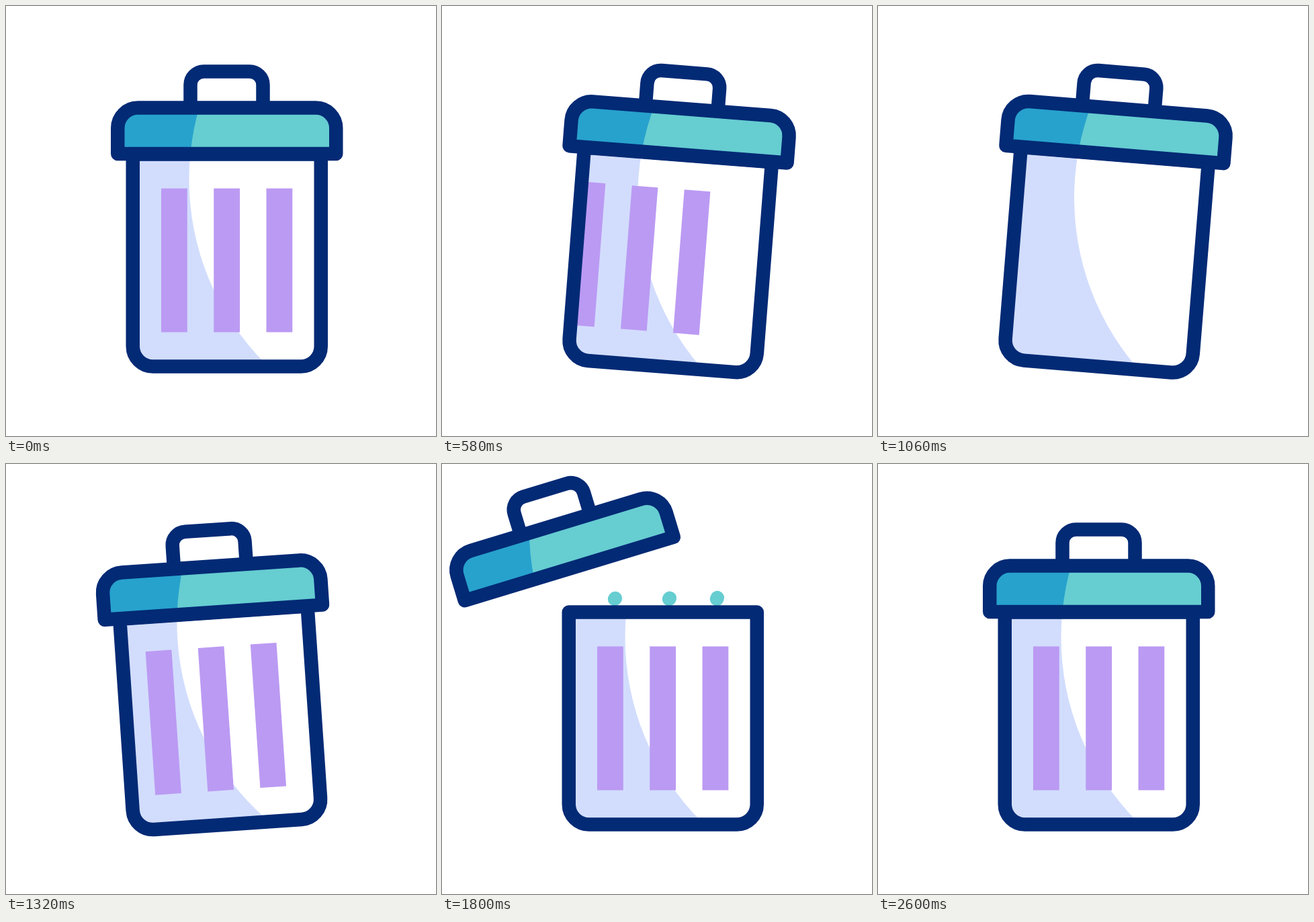
Recreate the animation shown at these times as an HTML page with a canvas. Size 640 px wide and 640 px high, loop 2820 ms.

```html
<!DOCTYPE html>
<html lang="en">
<head>
<meta charset="utf-8">
<title>Trash can</title>
<style>
  html, body { margin: 0; width: 100%; height: 100%; overflow: hidden; background: #fff; }
  canvas { display: block; width: 640px; height: 640px; }
</style>
</head>
<body>
<canvas id="stage" width="640" height="640"></canvas>
<script>
const ctx = document.getElementById('stage').getContext('2d');
const LOOP = 2820;
const NAVY = '#032a75', TEAL = '#66cdd1', BLUE = '#27a2cd';
const LAVENDER = '#d2ddfd', PURPLE = '#bb9af3', WHITE = '#fff';
const LINE = 20.5;
const MID_X = 328.75, PIVOT_Y = 512, LID_Y = 209.5;

// Keyframes as [time, value]
const TILT = [[0, 0], [458, 10], [792, -8], [1125, 6], [1333, -4], [1542, 0]];
const SLIDE = [[458, 0], [958, -300], [1358, 0]];
const OPEN = [[1333, 0], [1783, 1], [2170, 1], [2600, 0]];
const GROW = [[1783, 0], [1985, 1]];
const FADE = [[1985, 0], [2190, 1]];
const FUMES = [[257, 45], [338, 60], [409, 85]];

const smooth = u => u * u * (3 - 2 * u);

function track(keys, t) {
  if (t <= keys[0][0]) return keys[0][1];
  for (let i = 1; i < keys.length; i++) {
    const [t0, v0] = keys[i - 1], [t1, v1] = keys[i];
    if (t < t1) return v0 + (v1 - v0) * smooth((t - t0) / (t1 - t0));
  }
  return keys[keys.length - 1][1];
}

function rotateAt(x, y, degrees) {
  ctx.translate(x, y);
  ctx.rotate(degrees * Math.PI / 180);
  ctx.translate(-x, -y);
}

function outline(path) {
  ctx.strokeStyle = NAVY;
  ctx.lineWidth = LINE;
  ctx.lineJoin = 'round';
  ctx.lineCap = 'butt';
  ctx.stroke(path);
}

function box(x, y, right, bottom, radii) {
  const path = new Path2D();
  path.roundRect(x, y, right - x, bottom - y, radii);
  return path;
}

const body = box(188.75, 220.5, 468.75, 536.6, [0, 0, 30, 30]);
const lid = box(166.25, 151.6, 491.25, 220, [30, 30, 0, 0]);
const handle = new Path2D('M274.5 151V117.5a20 20 0 0 1 20-20h68a20 20 0 0 1 20 20V151');

// Both parts share one large circle that separates shade from light
function fillShaded(path, shade, light) {
  ctx.clip(path);
  ctx.fillStyle = shade;
  ctx.fillRect(140, 130, 380, 430);
  ctx.fillStyle = light;
  ctx.beginPath();
  ctx.arc(660.5, 258, 388, 0, Math.PI * 2);
  ctx.fill();
}

function drawBody(slide) {
  ctx.save();
  fillShaded(body, LAVENDER, WHITE);
  ctx.fillStyle = PURPLE;
  for (let i = 0; i < 3; i++) {
    ctx.fillRect(231 + i * 78.25 + slide, 271.5, 38.8, 214);
  }
  ctx.restore();
  outline(body);
}

function drawLid(open) {
  ctx.save();
  ctx.translate(-142.5 * open ** 1.175, -63.5 * (1 - (1 - open) ** 2.466));
  rotateAt(MID_X, LID_Y, -16.9 * open);
  ctx.save();
  fillShaded(lid, BLUE, TEAL);
  ctx.restore();
  outline(handle);
  outline(lid);
  ctx.restore();
}

function drawFumes(from, to) {
  if (to - from < 0.002) return;
  ctx.strokeStyle = TEAL;
  ctx.lineWidth = LINE;
  ctx.lineCap = ctx.lineJoin = 'round';
  for (const [x, height] of FUMES) {
    ctx.beginPath();
    for (let i = 0; i <= 30; i++) {
      const s = from + (to - from) * i / 30;
      ctx.lineTo(x + 6 * Math.sin(s * Math.PI * 2), 201 - s * height);
    }
    ctx.stroke();
  }
}

function draw(t) {
  ctx.fillStyle = WHITE;
  ctx.fillRect(0, 0, 640, 640);
  ctx.save();
  rotateAt(MID_X, PIVOT_Y, track(TILT, t));
  drawFumes(track(FADE, t), track(GROW, t));
  drawBody(track(SLIDE, t));
  drawLid(track(OPEN, t));
  ctx.restore();
}

const start = performance.now();
function tick() {
  draw((performance.now() - start) % LOOP);
  requestAnimationFrame(tick);
}
tick();
</script>
</body>
</html>
```
